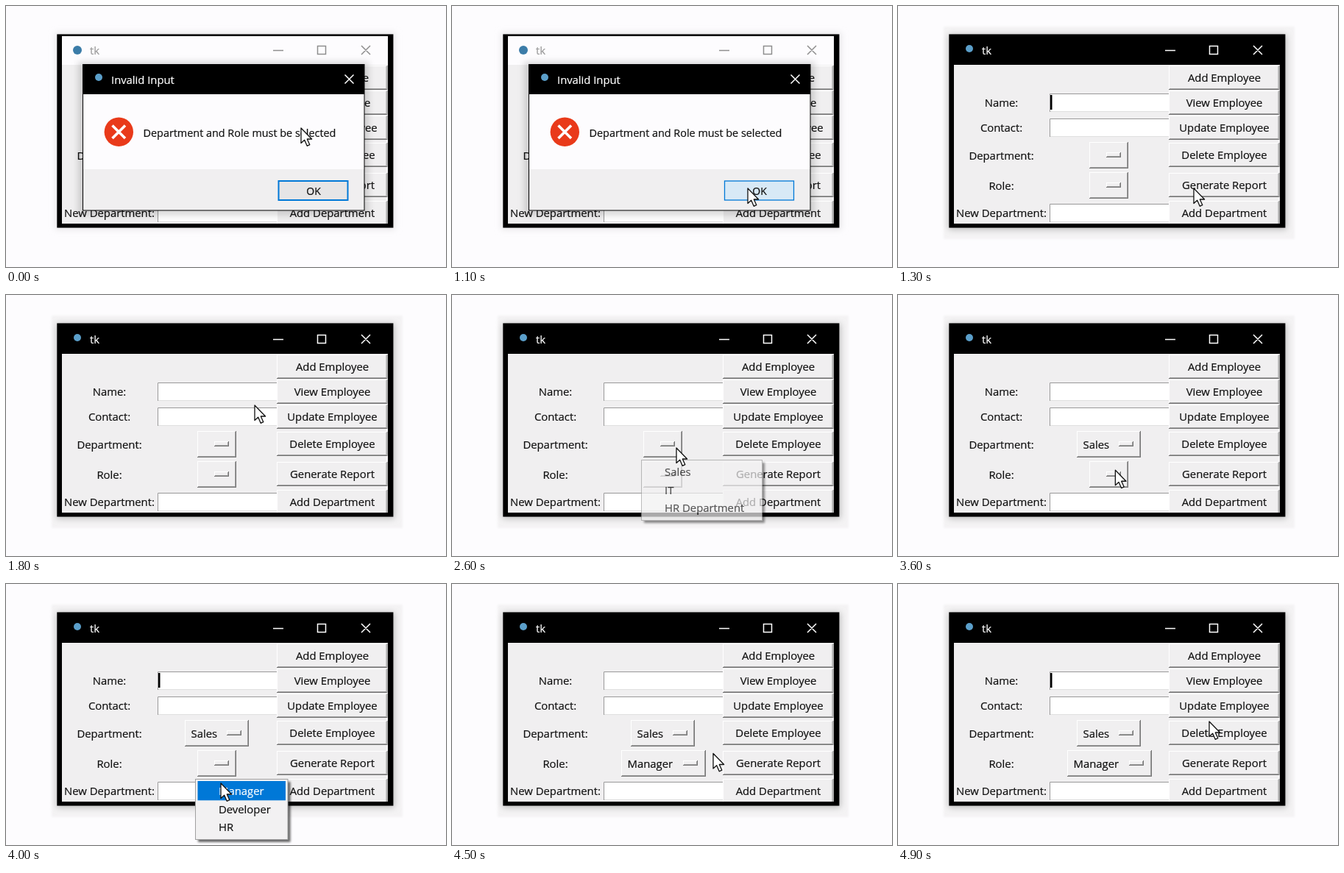
Write an HTML page that moves like this. It is 598 px wide and 355 px high and loops after 5 s.

```html
<!DOCTYPE html>
<html lang="en">
<head>
<meta charset="utf-8">
<title>Employee form</title>
<style>
html, body { margin: 0; width: 100%; height: 100%; overflow: hidden; background: #fdfcfe; }
svg { display: block; width: 598px; height: 355px; }
text { font-family: "Open Sans", "Noto Sans", sans-serif; stroke-width: .2px; white-space: pre; }
</style>
</head>
<body>
<svg id="stage" viewBox="0 0 598 355">
  <defs>
    <filter id="blur" x="-20%" y="-20%" width="140%" height="140%"><feGaussianBlur stdDeviation="4"/></filter>
    <filter id="soft"><feGaussianBlur stdDeviation="1.5"/></filter>
  </defs>
</svg>
<script>
const LOOP = 5000, STEP = 100;
const FACE = '#f0eff0', BLUE = '#0078d7', INK = '#111';
const stage = document.getElementById('stage');

function add(parent, tag, attrs, content) {
  const el = document.createElementNS('http://www.w3.org/2000/svg', tag);
  for (const k in attrs) el.setAttribute(k, attrs[k]);
  if (content) el.textContent = content;
  parent.appendChild(el);
  return el;
}
const group = (p = stage) => add(p, 'g', {});
const rect = (p, x, y, r, b, fill, more) =>
  add(p, 'rect', { x, y, width: r - x, height: b - y, fill, ...more });
const line = (p, d, stroke, width = 1) =>
  add(p, 'path', { d, stroke, fill: 'none', 'stroke-width': width });
// cy is the middle of the line of text
const label = (p, x, cy, s, anchor = 'middle', size = 14.85, fill = INK) =>
  add(p, 'text', { x, y: cy + 5.3, 'text-anchor': anchor, 'font-size': size, fill, stroke: fill }, s);
const show = (el, on) => el.setAttribute('opacity', Number(on));

function raised(p, x, y, r, b) {
  rect(p, x, y, r, b, '#747474');
  rect(p, x, y, r - 1, b - 1, '#fff');
  rect(p, x + 1, y + 1, r - 1, b - 1, '#a0a0a0');
  rect(p, x + 1, y + 1, r - 2, b - 2, FACE);
}
function entry(y) {
  rect(win, 206, y, 368, y + 25, '#fff');
  line(win, `M206.5 ${y + 25}V${y + .5}H368`, '#999');
  line(win, `M207 ${y + 24.5}H368`, '#e0e0e0');
}
function option(x, y, r, mark, s) {
  const g = group(win);
  raised(g, x, y, r, y + 36);
  raised(g, mark, y + 14, mark + 20, y + 21);
  if (s) label(g, x + 8.5, y + 19, s, 'start');
  return g;
}
function controls(p, color) {
  line(p, 'M363 60.5H377M423.5 54.5H434.5V65.5H423.5ZM483 54L495 66M495 54L483 66', color, 1.5);
}

// main window
const activeShade = group();
rect(activeShade, 62, 28, 539, 317, '#f4f3f4', { filter: 'url(#soft)' });
rect(activeShade, 69, 39, 528, 304, '#bbb', { filter: 'url(#blur)' });
const idleShade = rect(stage, 67, 36, 529, 304, '#e6e5e7', { filter: 'url(#blur)' });
const win = group();
rect(win, 69.3, 38.4, 526.4, 301.6, '#000');
rect(win, 76, 80, 519, 296, FACE);

const idleBar = group(win);
rect(idleBar, 76, 41, 519, 80, '#fdfcfe');
add(idleBar, 'circle', { cx: 97, cy: 60, r: 6, fill: '#3b7ca8' });
label(idleBar, 114, 60.8, 'tk', 'start', 15, '#9a9a9a');
controls(idleBar, '#8e8e8e');

const activeBar = group(win);
add(activeBar, 'circle', { cx: 97, cy: 58, r: 5, fill: '#5b9fca' });
label(activeBar, 114, 60.8, 'tk', 'start', 15, '#fff');
controls(activeBar, '#fff');

[['Name:', 132], ['Contact:', 166], ['Department:', 204], ['Role:', 244.6], ['New Department:', 281.8]]
  .forEach(([s, y]) => label(win, 140.5, y, s));
[119, 153, 269].forEach(entry);
const caret = rect(win, 207, 121, 209.5, 141, '#000');
[['Add Employee', 81, 98], ['View Employee', 115, 132], ['Update Employee', 149, 166],
 ['Delete Employee', 186, 203], ['Generate Report', 227, 243.8], ['Add Department', 265, 281.8]]
  .forEach(([s, y, cy]) => {
    raised(win, 368, y, 518.5, y + 33);
    label(win, 443.5, cy, s);
  });
rect(win, 76, 296, 526, 301, '#000');

const deptEmpty = option(260, 185, 313, 283);
const deptSet = option(243, 185, 330, 300, 'Sales');
const roleEmpty = option(260, 226, 313, 283);
const roleSet = option(230, 226, 345, 314, 'Manager');

// drop-down lists
function menu(y, r, items) {
  const g = group();
  const b = y + 82.5;
  rect(g, 261, y + 4, r + 3.5, b + 3.5, '#000', { 'fill-opacity': .6, filter: 'url(#soft)' });
  rect(g, 257.5, y + .5, r, b, '#f2f1f2', { stroke: '#a0a0a0' });
  const bar = rect(g, 260.5, y + 3, r - 3, y + 29.3, BLUE);
  const first = items.map((s, i) => label(g, 289, y + 16.5 + 24.7 * i, s, 'start'))[0];
  return (opacity, hover) => {
    const ink = hover ? '#fff' : INK;
    show(g, opacity);
    show(bar, hover);
    first.setAttribute('fill', ink);
    first.setAttribute('stroke', ink);
  };
}
const deptMenu = menu(224, 421.5, ['Sales', 'IT', 'HR Department']);
const roleMenu = menu(265, 383, ['Manager', 'Developer', 'HR']);

// error dialog
const dialog = group();
rect(dialog, 98, 76, 493, 285, '#000', { 'fill-opacity': .15, filter: 'url(#blur)' });
rect(dialog, 104, 79, 487.5, 278.5, '#000');
rect(dialog, 105, 120, 486.5, 222, '#fdfcfe');
rect(dialog, 105, 222, 486.5, 277.5, FACE);
add(dialog, 'circle', { cx: 126, cy: 97, r: 5, fill: '#5b9fca' });
label(dialog, 143, 100.5, 'Invalid Input', 'start', 14.8, '#fff');
line(dialog, 'M460.5 93.5L472.5 105.5M472.5 93.5L460.5 105.5', '#fff', 1.5);
add(dialog, 'circle', { cx: 153.3, cy: 171.3, r: 19.7, fill: '#e93a1a' });
line(dialog, 'M144.5 162.5L162 180M162 162.5L144.5 180', '#fff', 3.6);
label(dialog, 186.5, 172.6, 'Department and Role must be selected', 'start', 14.4);
const ok = rect(dialog, 370.5, 238, 464.5, 264, '#e6e5e6', { stroke: BLUE });
label(dialog, 418, 251.5, 'OK', 'middle', 14);

const pointer = add(stage, 'path', {
  d: 'M0 0V20.5L4.7 16.3L8.2 24.3L11.8 22.7L8.3 15H14.6Z',
  fill: '#fff', stroke: '#111', 'stroke-width': 1.3, 'stroke-linejoin': 'round'
});

// pointer stops: time, x, y
const path = [
  [0, 401, 166], [100, 401, 166], [600, 402, 248], [1300, 402, 248], [1800, 338, 150],
  [2200, 305, 208], [2700, 305, 208], [3000, 305, 239], [3400, 305, 239],
  [3700, 292, 238], [3800, 292, 238], [4000, 292, 271], [4200, 292, 271],
  [4800, 418, 190], [4900, 423, 187], [5000, 423, 187]
];
function pointerAt(t) {
  const i = path.findIndex(k => k[0] > t);
  const [t0, x0, y0] = path[i - 1], [t1, x1, y1] = path[i];
  const u = (t - t0) / (t1 - t0), e = u * u * (3 - 2 * u);
  return [x0 + (x1 - x0) * e, y0 + (y1 - y0) * e];
}
const fadeIn = (t, start, time) => Math.max(0, Math.min(1, (t - start) / time));

function draw(t) {
  const [x, y] = pointerAt(t);
  pointer.setAttribute('transform', `translate(${x} ${y})`);

  const active = t >= 1200;
  show(activeShade, active);
  show(idleShade, !active);
  show(activeBar, active);
  show(idleBar, !active);
  show(dialog, t < 1200 ? 1 : t < 1300 ? .4 : 0);

  const over = y > 237 && t < 1300;
  ok.setAttribute('fill', !over ? '#e6e5e6' : t < 1000 ? '#e5f1fb' : '#d8e9f6');
  ok.setAttribute('stroke-width', over ? 1.3 : 2);

  // caret: 600 ms on, 300 ms off
  show(caret, t >= 1300 && (t + 800) % 900 < 600);

  const dept = t >= 3400, role = t >= 4300;
  show(deptEmpty, !dept);
  show(deptSet, dept);
  show(roleEmpty, !role);
  show(roleSet, role);
  deptMenu(dept ? 0 : fadeIn(t, 2390, 300), y > 228);
  roleMenu(role ? 0 : fadeIn(t, 3700, 200), y > 268);
}

function frame(now) {
  draw(Math.floor((now % LOOP) / STEP) * STEP);
  requestAnimationFrame(frame);
}
draw(0);
requestAnimationFrame(frame);
</script>
</body>
</html>
```
